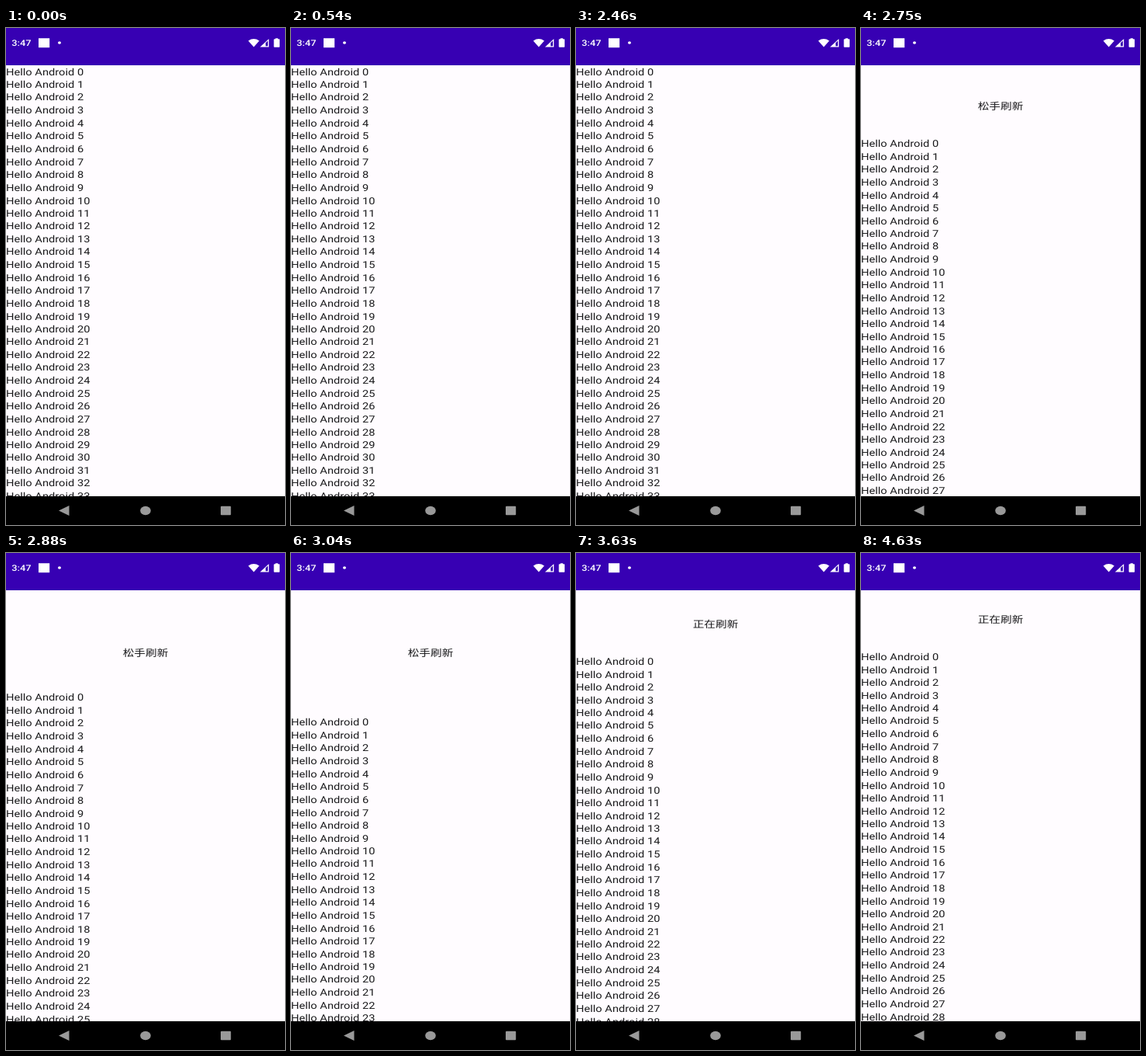
Animation, 360 px wide and 640 px high, one loop 5.04 s. Source, as an HTML page:

```html
<!DOCTYPE html>
<html lang="zh-CN">
<head>
<meta charset="utf-8">
<title>Pull to refresh</title>
<style>
  html, body { margin: 0; width: 100%; height: 100%; overflow: hidden; background: #000; }
  /* The phone screen is 9:19, shown squashed to 9:16. */
  #screen {
    position: absolute; left: 0; top: 0; width: 360px; height: 760px;
    transform: scaleY(.842105); transform-origin: 0 0;
    font: 14.667px/19.667px Roboto, "Noto Sans CJK SC", "Noto Sans CJK", sans-serif;
    text-rendering: geometricPrecision; color: #1a1a1c; overflow: hidden;
  }
  #bar { position: absolute; inset: 0 0 auto; height: 57px; background: #3700b3; }
  #clock {
    position: absolute; left: 7.3px; top: 13.5px; color: #fff;
    font-size: 12.833px; font-weight: 500;
  }
  #content {
    position: absolute; left: 0; top: 57px; width: 360px; height: 659px;
    background: #fffcff; overflow: hidden;
  }
  #list { position: absolute; left: 0; top: .83px; white-space: nowrap; }
  #header { position: absolute; left: 0; top: 0; width: 360px; text-align: center; }
  #icons { position: absolute; left: 0; top: 0; }
</style>
</head>
<body>
<div id="screen">
  <div id="bar"><div id="clock">3:47</div></div>
  <div id="content">
    <div id="header"></div>
    <div id="list"></div>
  </div>
</div>
<svg id="icons" width="360" height="640" viewBox="0 0 360 640">
  <g fill="#fff">
    <path d="M42 13.2h14.2v12h-14.2z"/>
    <ellipse cx="69" cy="19" rx="2" ry="1.7"/>
    <path d="M312.6 16.4Q319.7 11.6 326.8 16.4L319.7 24.5Z"/>
    <path d="M327.8 24.4L339.2 14V24.4Z"/>
    <path d="M347.6 14.2V13.2H350.9V14.2H352.4Q353.1 14.2 353.1 14.9V24Q353.1 24.7 352.4 24.7H346.3Q345.6 24.7 345.6 24V14.9Q345.6 14.2 346.3 14.2Z"/>
  </g>
  <path d="M335 19.3L337.9 16.6V23.3H335Z" fill="#3700b3"/>
  <g fill="#999">
    <path d="M68 621.5L81.5 615V628Z"/>
    <ellipse cx="180" cy="621.5" rx="6.8" ry="5.7"/>
    <rect x="277" y="615.8" width="13.2" height="11.5" rx="1"/>
  </g>
</svg>
<script>
const LOOP = 5040, FRAME = 1000 / 24, SQUASH = 16 / 19;
const TOUCH = 2560, STOP = 3300, RELEASE = 3410, SETTLE = 300;
const REFRESH = 77.2, HEADER_MAX = 120.5;

const list = document.getElementById('list');
const header = document.getElementById('header');
list.innerHTML = Array.from({ length: 36 }, (_, i) => `<div>Hello Android ${i}</div>`).join('');

// cubic-bezier(.4, 0, .2, 1)
function fastOutSlowIn(x) {
  let lo = 0, hi = 1, s = .5;
  for (let i = 0; i < 20; i++) {
    s = (lo + hi) / 2;
    const bx = 1.2 * (1 - s) ** 2 * s + .6 * (1 - s) * s * s + s ** 3;
    if (bx < x) lo = s; else hi = s;
  }
  return s * s * (3 - 2 * s);
}

// Damped finger drag
const drag = t => 210 * (1 - Math.exp((TOUCH - Math.min(t, STOP)) / 327));

function pullAt(t) {
  if (t < TOUCH) return 0;
  if (t < RELEASE) return drag(t);
  const p = Math.min(1, (t - RELEASE) / SETTLE);
  return p === 1 ? REFRESH : drag(STOP) + (REFRESH - drag(STOP)) * fastOutSlowIn(p);
}

function moveTo(el, y) {
  el.style.transform = `translateY(${(y / SQUASH).toFixed(3)}px)`;
}

function draw(t) {
  const pull = pullAt(t);
  moveTo(list, pull);
  moveTo(header, Math.min(pull, HEADER_MAX) - REFRESH / 2 - 8.3);
  const label = t >= RELEASE ? '正在刷新' : pull > REFRESH ? '松手刷新' : '下拉刷新';
  if (header.textContent !== label) header.textContent = label;
}

const start = performance.now();
function tick() {
  const t = (performance.now() - start) % LOOP;
  draw(Math.floor((t + 5) / FRAME) % 121 * FRAME);
  requestAnimationFrame(tick);
}
draw(0);
requestAnimationFrame(tick);
</script>
</body>
</html>
```
